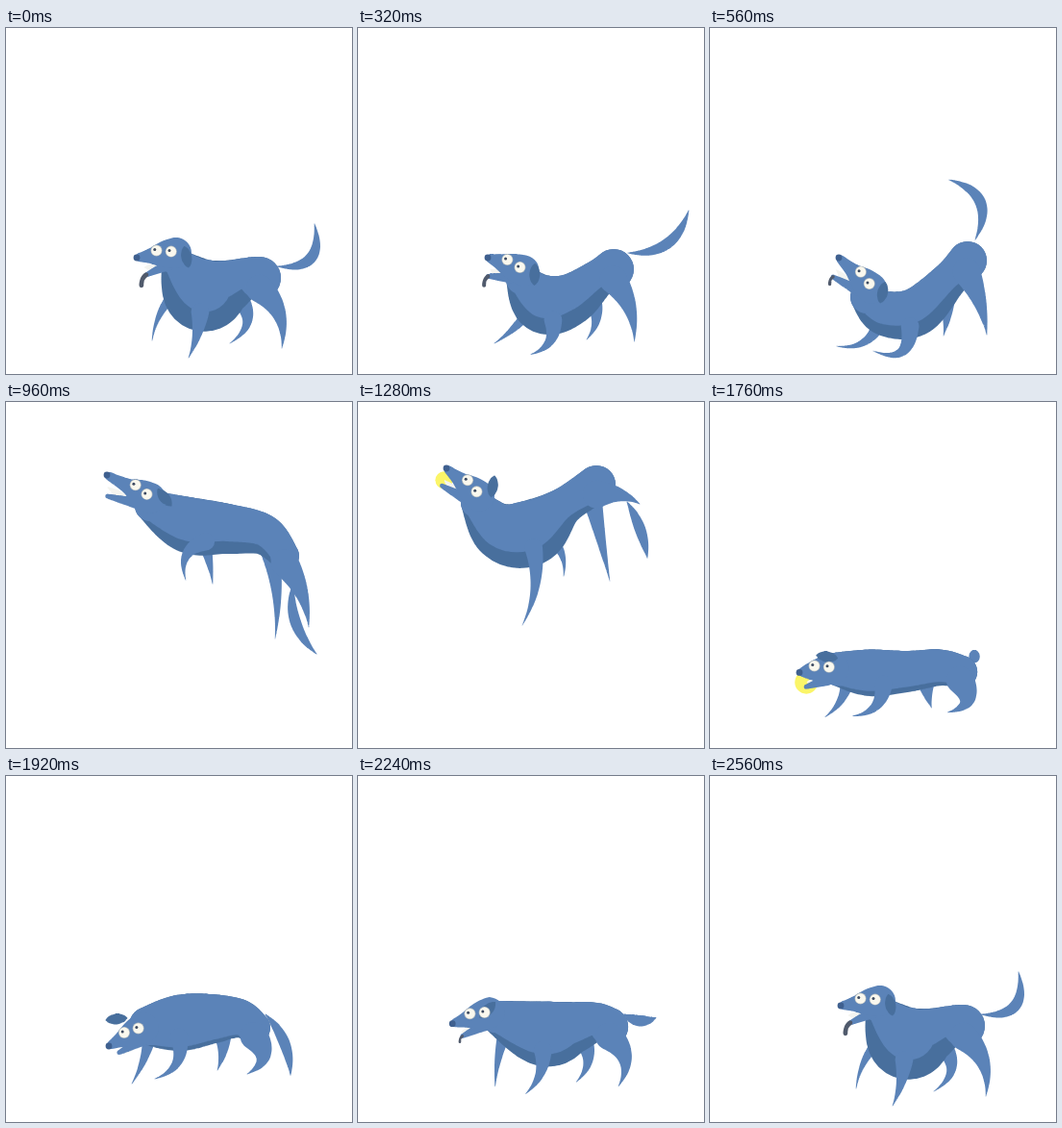
These frames come from a looping animation (360 by 360 pixels, 2.64 s). An HTML page with a canvas:

```html
<!DOCTYPE html>
<html lang="en">
<head>
<meta charset="utf-8">
<title>Jumping dog</title>
<style>
  html, body { margin: 0; width: 100%; height: 100%; overflow: hidden; background: #fff; }
  canvas { display: block; width: 360px; height: 360px; }
</style>
</head>
<body>
<canvas width="360" height="360"></canvas>
<script>
const ctx = document.querySelector('canvas').getContext('2d');
const LOOP = 2640, STEP = 80;
const COAT = '#5b83b8', SHADE = '#486f9d', NOSE = '#3f608f', TONGUE = '#505a6c';

// body: x, y, radius from neck to rump
// head: skull x, y, snout tip x, y, jaw angle, ear tip x, y
// tail: root x, y, tip x, y, bend
// legs: place along the spine, foot x, y, bend
// look: belly shade, tongue length
const stand = {
  body: [176,243,14, 202,277,37, 226,271,29, 251,259,20, 264,260,22],
  head: [177,234, 136,239, .3, 190,249],
  tail: [282,248, 321,204, .7],
  farFront: [.1, 152,325, .2], nearFront: [.25, 190,343, -.1],
  farBack: [.62, 233,328, -.6], nearBack: [1, 287,333, -.29],
  look: [.32, 1]
};
const bow = {
  body: [163,280,17, 182,297,23, 215,295,25, 249,262,19, 268,242,20],
  head: [168,271, 134,239, .25, 177,286],
  tail: [276,220, 249,158, .6],
  farFront: [.2, 132,331, -.4], nearFront: [.45, 170,336, -.75],
  farBack: [.72, 243,320, -.1], nearBack: [.97, 288,319, -.1],
  look: [.3, .7]
};
const leap = {
  body: [150,108,16, 190,128,29, 230,132,26, 268,138,21, 290,160,15],
  head: [150,100, 105,76, .25, 172,108],
  tail: [299,188, 323,262, .27],
  farFront: [.35, 215,189, -.05], nearFront: [.36, 187,185, .5],
  farBack: [.8, 280,246, -.1], nearBack: [1, 315,234, -.15],
  look: [.25, 0]
};
const grab = {
  body: [122,105,15, 148,135,29, 180,136,34, 214,109,20, 248,86,20],
  head: [126,98, 92,69, .2, 142,77],
  tail: [280,104, 301,162, -.1],
  farFront: [.62, 214,181, -.3], nearFront: [.52, 171,232, -.18],
  farBack: [.95, 262,186, 0], nearBack: [1, 293,106, -.2],
  look: [.25, 0]
};
const land = {
  body: [112,305,14, 145,319,17, 190,322,15, 235,313,17, 266,309,17],
  head: [108,300, 72,282, .5, 121,278],
  tail: [284,302, 244,183, .13],
  farFront: [.2, 103,339, -.4], nearFront: [.5, 139,344, -.4],
  farBack: [.7, 246,336, .4], nearBack: [.95, 242,342, -1],
  look: [.2, 0]
};
const slink = {
  body: [148,260,20, 180,257,29, 212,253,26, 242,252,20, 258,262,17],
  head: [143,262, 107,281, 0, 104,254],
  tail: [270,248, 296,311, -.2],
  farFront: [.02, 131,320, -.1], nearFront: [.25, 155,315, -.45],
  farBack: [.6, 220,306, -.15], nearBack: [1, 251,310, -.65],
  look: [.08, 0]
};

const lerp = (a, b, k) => a + (b - a) * k;
const clamp = k => Math.min(1, Math.max(0, k));
const easeOut = k => 1 - (1 - k) ** 2;

function mix(a, b, k) {
  const out = {};
  for (const part in a) out[part] = a[part].map((v, i) => lerp(v, b[part][i], k));
  return out;
}

const lean = {
  ...slink,
  body: slink.body.map((v, i) => i ? v : v - 45),
  head: slink.head.map((v, i) => i % 2 || i === 4 ? v : v - 56)
};
lean.head[5] -= 56;
lean.head[6] = slink.head[6];

const keys = [
  [0, stand], [80, stand],
  [320, { ...mix(stand, bow, .5), tail: [281,234, 344,190, .4] }],
  [560, bow], [720, bow], [960, leap], [1280, grab],
  [1360, { ...mix(grab, land, .3), tail: [277,150, 262,0, .2] }],
  [1520, land], [1920, slink], [2080, lean, easeOut],
  [2560, stand], [LOOP, stand]
];

function poseAt(t) {
  const i = keys.findIndex(key => key[0] > t);
  const [from, a, ease = k => k] = keys[i - 1], [to, b] = keys[i];
  return mix(a, b, ease((t - from) / (to - from)));
}

// Point and radius at u = 0..1 on a smooth curve through x,y,r triples.
function along(p, u) {
  const n = p.length / 3 - 1, i = Math.min(n - 1, Math.floor(u * n)), k = u * n - i;
  return [0, 1, 2].map(j => {
    const [a, b, c, d] = [-1, 0, 1, 2].map(o => p[3 * Math.min(n, Math.max(0, i + o)) + j]);
    return b + k / 2 * (c - a + k * (2 * a - 5 * b + 4 * c - d + k * (3 * (b - c) + d - a)));
  });
}

// Fills the sweep of a circle; at(u) gives x, y, r.
function sweep(at, color, steps = 90) {
  ctx.beginPath();
  for (let s = 0; s <= steps; s++) {
    const [x, y, r] = at(s / steps);
    ctx.moveTo(x + r, y);
    ctx.arc(x, y, Math.max(.1, r), 0, 7);
  }
  ctx.fillStyle = color;
  ctx.fill();
}

const dot = (x, y, r, color) => sweep(() => [x, y, r], color, 0);

// Bent taper between two points.
function limb(x, y, tx, ty, bend, radius, color) {
  const cx = (x + tx) / 2 - (ty - y) * bend, cy = (y + ty) / 2 + (tx - x) * bend;
  sweep(u => [
    lerp(lerp(x, cx, u), lerp(cx, tx, u), u),
    lerp(lerp(y, cy, u), lerp(cy, ty, u), u),
    radius(u)
  ], color);
}

const taper = r => u => r * (1 - u) ** 1.1 + .4;
const leaf = r => u => r * Math.sin(Math.PI * u) + .5;

function leg(body, [place, fx, fy, bend], r) {
  const [x, y, half] = along(body, place);
  limb(x, y + half / 2, fx, fy, bend, taper(r), COAT);
}

function trunk(body, shade) {
  sweep(u => along(body, u), SHADE);
  // Smaller circles pressed against the back leave the belly dark.
  sweep(u => {
    const [x, y, r] = along(body, u);
    const [ax, ay] = along(body, Math.max(0, u - .01)), [bx, by] = along(body, Math.min(1, u + .01));
    const k = shade * Math.sqrt(Math.max(0, Math.sin(Math.PI * u)));
    const d = r * k / Math.hypot(bx - ax, by - ay);
    return [x + (by - ay) * d, y - (bx - ax) * d, r * (1 - k)];
  }, COAT);
}

function eye(x, y) {
  dot(x, y, 6, '#b5bcbf');
  dot(x, y, 5.3, '#faf8ee');
  dot(x - 1.8, y - 1, 1.5, '#3d4a60');
}

function drawHead([x, y, tx, ty, open, ex, ey], lick, t) {
  const len = Math.hypot(tx - x, ty - y), fx = (tx - x) / len, fy = (ty - y) / len;
  const at = (f, up) => [x + fx * f - fy * up, y + fy * f + fx * up];

  if (t >= 1200 && t < 1920) {
    const k = clamp((t - 1120) / 160), [bx, by] = at(len - 6, -11);
    dot(lerp(36, bx, k), lerp(42, by, k), 9 + 3 * clamp((t - 1280) / 240), '#fbf568');
  }

  const hinge = at(8, -11), jawLen = len * .65;
  const chin = at(8 + jawLen * Math.cos(open), -11 - jawLen * Math.sin(open));
  limb(...at(16, -13), ...at(len - 7, -11), 0, leaf(3), '#f4f4f0');
  limb(...hinge, ...chin, 0, u => lerp(6, 2.3, u), COAT);
  if (lick > .1) {
    limb(...chin, chin[0] - 5 * lick, chin[1] + 11 * lick, .25, () => 2.4 * lick, TONGUE);
  }

  const snout = [...at(0, 0), 16, ...at(10, 0), 14, ...at(26, 0), 8, ...at(len - 3, 0), 4.5];
  sweep(u => along(snout, u), COAT);
  dot(tx, ty, 3.4, NOSE);

  const [rx, ry] = at(-9, 9), k = 22 / Math.hypot(rx - ex, ry - ey);
  limb(lerp(ex, rx, k), lerp(ey, ry, k), ex, ey, 0, leaf(5), SHADE);
  eye(...at(20, 5));
  eye(...at(5, 2));
}

function draw(t) {
  const p = poseAt(t), [shade, lick] = p.look;
  ctx.clearRect(0, 0, 360, 360);
  limb(...p.tail, leaf(5.2), COAT);
  leg(p.body, p.farFront, 7);
  leg(p.body, p.farBack, 10);
  trunk(p.body, shade);
  leg(p.body, p.nearBack, 14);
  leg(p.body, p.nearFront, 9);
  drawHead(p.head, lick, t);
}

const start = performance.now();
function tick(now) {
  const t = Math.max(0, now - start) % LOOP;
  draw(Math.floor(t / STEP) * STEP);
  requestAnimationFrame(tick);
}
tick(start);
</script>
</body>
</html>
```
